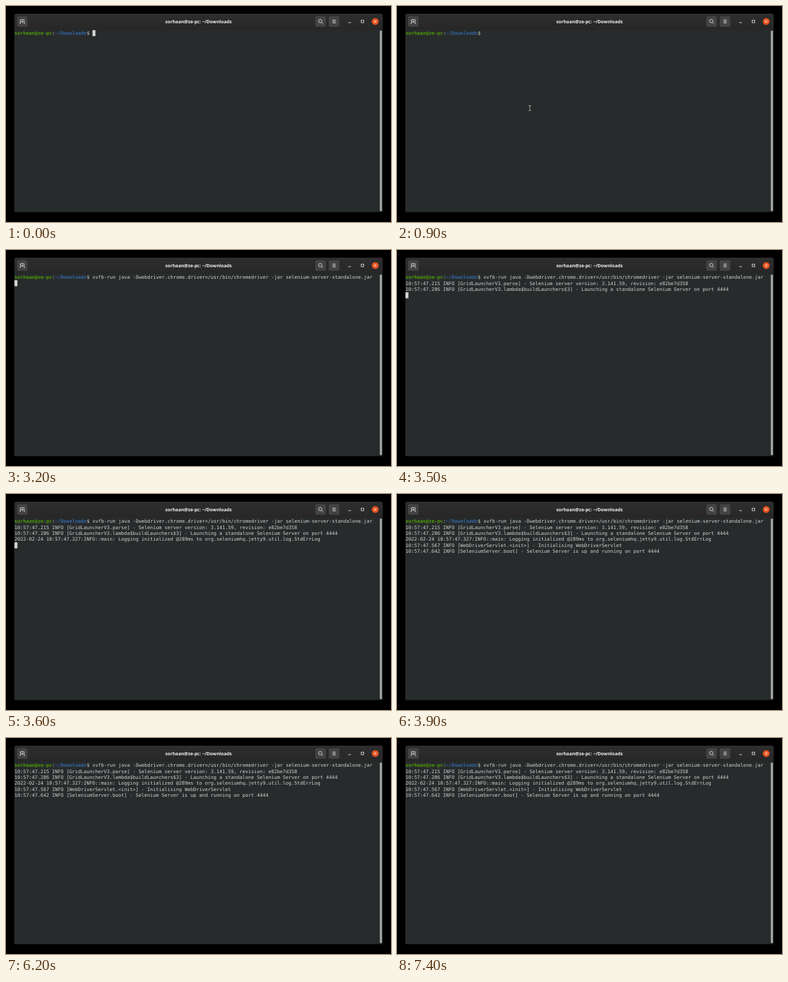
An HTML page for the animation above (8 s loop, 600 by 338 pixels).

```html
<!DOCTYPE html>
<html lang="en">
<head>
<meta charset="utf-8">
<title>Terminal</title>
<style>
  html, body { margin: 0; width: 100%; height: 100%; overflow: hidden; background: #000; }
  svg { display: block; width: 100vw; height: 100vh; }
  text { white-space: pre; text-rendering: geometricPrecision; }
  #screen text { font: 7.48px "DejaVu Sans Mono", monospace; fill: #d0d3cf; }
  #title { font: bold 7.1px "Open Sans", sans-serif; fill: #f4f4f4; text-anchor: middle; }
  .prompt { font-weight: bold; }
  .user { fill: #4e9a06; }
  .path { fill: #3465a4; }
  .button { fill: #434343; }
  .icon { fill: none; stroke: #e4e4e4; stroke-width: .9; }
</style>
</head>
<body>
<svg viewBox="0 0 600 338">
  <defs>
    <linearGradient id="header" x2="0" y2="1">
      <stop stop-color="#2e2e2e"/>
      <stop offset="1" stop-color="#272727"/>
    </linearGradient>
  </defs>
  <rect width="600" height="338"/>

  <path d="M13 322.5V16q0-4 4-4H583q4 0 4 4V322.5z" fill="#272b2c"/>
  <path d="M13 37V16q0-4 4-4H583q4 0 4 4V37z" fill="url(#header)"/>
  <text id="title" x="300" y="26.6"></text>

  <g class="button">
    <rect x="17" y="16" width="16.5" height="16.5" rx="2.2"/>
    <rect x="482" y="16" width="16.5" height="16.5" rx="2.2"/>
    <rect x="503" y="16" width="16.5" height="16.5" rx="2.2"/>
  </g>
  <g class="icon">
    <path d="M21.2 27.4H22.4V21.4H28.2V27.4H29.4M25.3 22.8V26.4M23.5 24.6H27.1"/>
    <circle cx="489.7" cy="23.6" r="2.6"/>
    <path d="M491.6 25.5L493.8 27.7"/>
    <path d="M508.8 22H513.8M508.8 24.2H513.8M508.8 26.4H513.8"/>
    <path d="M533.4 26H537.6"/>
    <rect x="553.6" y="22.2" width="3.9" height="3.9"/>
  </g>
  <circle cx="575.4" cy="24.2" r="5.3" fill="#e95420"/>
  <path d="M573.6 22.4L577.2 26M577.2 22.4L573.6 26" stroke="#fff" stroke-width=".9"/>

  <rect x="582.6" y="38.5" width="3.2" height="282.5" rx="1.4" fill="#a9acab"/>
  <g id="screen"></g>
  <rect id="cursor" width="4.6" height="9.4" fill="#d3d7cf"/>
  <g id="pointer" fill="none" stroke-linecap="round">
    <path id="beam" d="M-1.8 -4H-.7L0 -3.4L.7 -4H1.8M0 -3.4V3.4M-1.8 4H-.7L0 3.4L.7 4H1.8" stroke="#111" stroke-width="2"/>
    <use href="#beam" id="beamCore"/>
    <path d="M-1.8 -4H-.7L0 -3.4L.7 -4H1.8M0 -3.4V3.4M-1.8 4H-.7L0 3.4L.7 4H1.8" stroke="#e8e8e8" stroke-width=".8"/>
  </g>
</svg>
<script>
  const LOOP = 8000, LEFT = 13.2, TOP = 37.8, COLUMN = 4.503, ROW = 9.45;
  const USER = "sorhaan@ze-pc", PATH = "~/Downloads";
  const PROMPT_LENGTH = `${USER}:${PATH}$ `.length;
  const COMMAND = "xvfb-run java -Dwebdriver.chrome.driver=/usr/bin/chromedriver -jar selenium-server-standalone.jar";
  const OUTPUT = [
    "10:57:47.215 INFO [GridLauncherV3.parse] - Selenium server version: 3.141.59, revision: e82be7d358",
    "10:57:47.286 INFO [GridLauncherV3.lambda$buildLaunchers$3] - Launching a standalone Selenium Server on port 4444",
    "2022-02-24 10:57:47.327:INFO::main: Logging initialized @289ms to org.seleniumhq.jetty9.util.log.StdErrLog",
    "10:57:47.567 INFO [WebDriverServlet.<init>] - Initialising WebDriverServlet",
    "10:57:47.642 INFO [SeleniumServer.boot] - Selenium Server is up and running on port 4444"
  ];

  // Each step: start time, then the value held until the next step.
  const PASTED = 1800, ENTERED = 3200;
  const outputSteps = [[0, 0], [3500, 2], [3600, 3], [3700, 4], [3900, 5]];
  const blinkSteps = [
    [0, true], [600, false], [1200, true], [2300, false], [2900, true], [3800, false],
    [4400, true], [5000, false], [5600, true], [6200, false], [6800, true], [7400, false]
  ];
  const pointerSteps = [
    [0, null], [600, [216, 172]], [700, [212, 167]], [800, [209, 162]], [900, [207, 159.8]], [ENTERED, null]
  ];
  const valueAt = (steps, time) => steps.findLast(([start]) => start <= time)[1];

  const byId = id => document.getElementById(id);
  const [screen, cursor, pointer] = ["screen", "cursor", "pointer"].map(byId);
  byId("beamCore").remove();
  byId("title").textContent = `${USER}: ${PATH}`;

  function addText(column, row, content, parts = [[content, ""]]) {
    const text = document.createElementNS(screen.namespaceURI, "text");
    text.setAttribute("x", LEFT + column * COLUMN);
    text.setAttribute("y", TOP + row * ROW + 7.3);
    for (const [string, style] of parts) {
      const span = document.createElementNS(screen.namespaceURI, "tspan");
      span.setAttribute("class", style);
      span.textContent = string;
      text.append(span);
    }
    screen.append(text);
    return text;
  }

  const show = (element, visible) => element.setAttribute("visibility", visible ? "visible" : "hidden");

  addText(0, 0, "", [[USER, "prompt user"], [":", ""], [PATH, "prompt path"], ["$ ", ""]]);
  const command = addText(PROMPT_LENGTH, 0, COMMAND);
  const output = OUTPUT.map((line, i) => addText(0, i + 1, line));

  function draw(time) {
    const lines = valueAt(outputSteps, time);
    const pasted = time >= PASTED, entered = time >= ENTERED;
    show(command, pasted);
    output.forEach((line, i) => show(line, i < lines));

    const column = entered ? 0 : PROMPT_LENGTH + (pasted ? COMMAND.length : 0);
    cursor.setAttribute("x", LEFT + column * COLUMN);
    cursor.setAttribute("y", TOP + (entered ? lines + 1 : 0) * ROW);
    show(cursor, valueAt(blinkSteps, time));

    const place = valueAt(pointerSteps, time);
    show(pointer, place);
    if (place) pointer.setAttribute("transform", `translate(${place})`);
  }

  const origin = performance.now();
  function tick() {
    draw((performance.now() - origin) % LOOP);
    requestAnimationFrame(tick);
  }
  tick();
</script>
</body>
</html>
```
